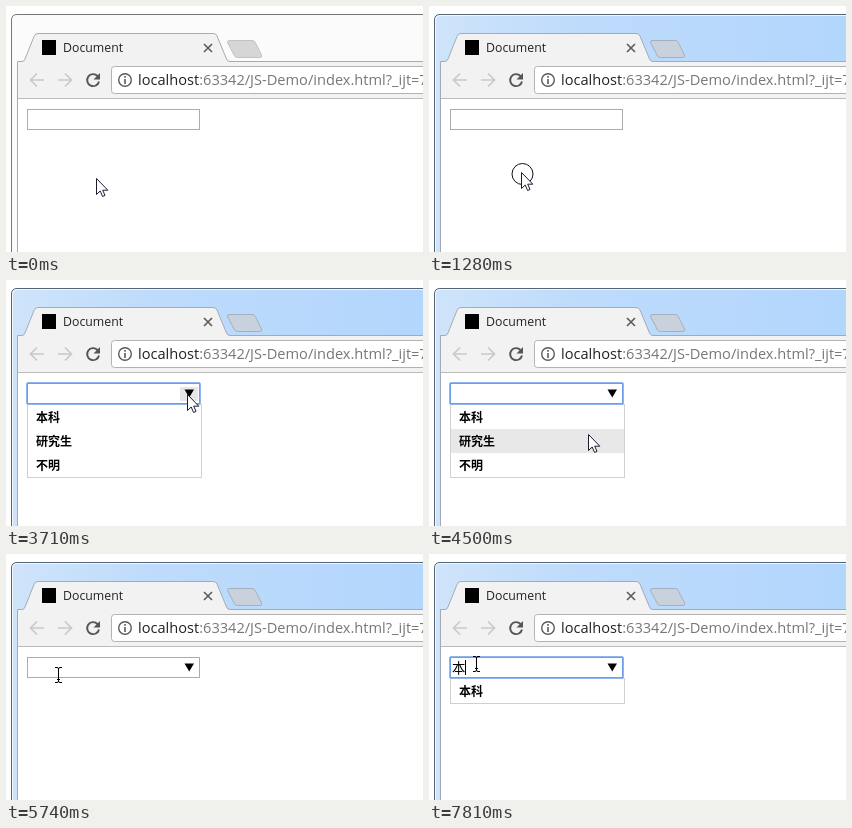
These frames come from a looping animation (417x246 px, 8 s). An HTML page:

```html
<!DOCTYPE html>
<html lang="en">
<head>
<meta charset="utf-8">
<title>Input with suggestions</title>
<style>
  html, body { margin: 0; width: 100%; height: 100%; overflow: hidden; background: #fff; }
  svg { display: block; width: 417px; height: 246px; }
  text { font-family: "Open Sans", "Noto Sans", sans-serif; white-space: pre; }
  .cjk { font-family: "Noto Sans CJK SC", "Noto Sans CJK", sans-serif; }
  .item { font-size: 12px; font-weight: 700; }
  .line { fill: none; stroke-width: 1; }
</style>
</head>
<body>
<svg viewBox="0 0 417 246">
  <defs>
    <linearGradient id="glass" x1="0" y1="0" x2="1" y2="0">
      <stop offset="0" stop-color="#cfe4fa"/>
      <stop offset=".35" stop-color="#bedbfb"/>
      <stop offset="1" stop-color="#b3d6fd"/>
    </linearGradient>
  </defs>

  <!-- window frame -->
  <path id="frame" d="M5.5 250V14Q5.5 8.500 11 8.500H420V250Z"/>
  <path id="shine" class="line" d="M6.500 250V14.500Q6.500 9.500 12 9.500H420" stroke="#fff" stroke-opacity=".75"/>
  <path id="plus" d="M223 34.500H246Q248.500 34.500 249.300 36.500L255.500 49Q256.500 51.500 254 51.500H231.500Q229 51.500 228 49L221.800 37Q221 34.500 223 34.500Z"/>

  <!-- tab and toolbar -->
  <path d="M11.500 250V55.500H16Q18 55.500 19 53L28 30.500Q29 27.500 32 27.500H207Q210 27.500 211 30L220.500 53Q221.500 55.500 224 55.500H420V250Z" fill="#f2f2f2" stroke="#a5abb2"/>
  <rect x="12" y="92" width="406" height="1" fill="#bcbcbc"/>
  <rect x="12" y="93" width="406" height="154" fill="#fff"/>
  <rect x="36" y="34" width="14" height="15" fill="#000"/>
  <text x="57" y="46" font-size="12.3" fill="#222">Document</text>
  <path d="M198 38L206 46M206 38L198 46" stroke="#5a5a5a" stroke-width="1.600"/>
  <g fill="none" stroke="#c9c9c9" stroke-width="1.700">
    <path d="M38 74H25M31 67.500L24.500 74L31 80.500"/>
    <path d="M52 74H65M59 67.500L65.500 74L59 80.500"/>
  </g>
  <path d="M91.500 70A6 6 0 1 0 93 75.500" fill="none" stroke="#555" stroke-width="1.900"/>
  <path d="M94 67V73.500H87.500Z" fill="#555"/>
  <rect x="105.500" y="60.500" width="330" height="27" rx="3" fill="#fff" stroke="#b3b3b3"/>
  <circle cx="119" cy="74" r="6.300" fill="none" stroke="#5a5a5a" stroke-width="1.400"/>
  <path d="M119 70V71.700M119 73V78" stroke="#5a5a5a" stroke-width="1.600"/>
  <text x="132" y="79" font-size="14.600" fill="#777"><tspan fill="#222">localhost</tspan>:63342/JS-Demo/index.html?_ijt=7</text>

  <!-- list of suggestions -->
  <g id="list">
    <rect id="panel" x="21.500" y="124.500" width="174" fill="#fff" stroke="#d0d0d0"/>
    <rect id="hover" x="22" width="173" height="24" fill="#e8e8e8"/>
    <text class="cjk item" x="30" y="142">本科</text>
    <g id="more">
      <text class="cjk item" x="30" y="166">研究生</text>
      <text class="cjk item" x="30" y="190">不明</text>
    </g>
  </g>

  <!-- input -->
  <rect x="21.500" y="103.500" width="172" height="20" fill="#fff" stroke="#ababab"/>
  <g id="focus" class="line">
    <rect x="20.500" y="102.500" width="174" height="22" rx="1.500" stroke="#8fb5ef"/>
    <rect x="21.500" y="103.500" width="172" height="20" stroke="#6c9de6"/>
  </g>
  <rect id="button" x="174" y="107" width="18" height="14" fill="#e6e6e6"/>
  <path id="arrow" d="M178.500 109.500H188L183.250 117.500Z"/>
  <text id="typed" class="cjk" x="23" y="118.500" font-size="13.300">本</text>
  <rect id="caret" y="106" width="1" height="15"/>

  <!-- input method -->
  <g id="ime">
    <rect x="24.500" y="126.500" width="400" height="50" fill="#fff" stroke="#b9c6d4"/>
    <rect x="32" y="151" width="386" height="1" fill="#e1e6ec"/>
    <text id="pinyin" x="34" y="144" font-size="14" fill="#333"></text>
    <text id="choices" class="cjk" x="34" y="169" font-size="14" fill="#333"></text>
  </g>

  <circle id="ring" r="10.500" class="line" stroke="#111"/>
  <path id="pointer" d="M.5 .5V16.500L4.200 13L6.600 18.500L9 17.400L6.700 12.200H11.800Z" fill="#fff" stroke="#1c1c30"/>
  <path id="beam" class="line" stroke="#000" d="M-3 -7.500H-1Q.5 -7.500 .5 -6V6Q.5 7.500 -1 7.500H-3M4 -7.500H2Q.5 -7.500 .5 -6V6Q.5 7.500 2 7.500H4M-1 4.500H2"/>
</svg>

<script>
const LOOP = 8000;
const el = {};
document.querySelectorAll("[id]").forEach(e => el[e.id] = e);

// Pointer legs: first change, last change, number of steps, points passed
const legs = [
  [60, 120, 2, [90, 172], [90, 170]],
  [340, 420, 2, [90, 170], [91, 166]],
  [570, 570, 1, [91, 166], [92, 166]],
  [1520, 1820, 6, [92, 166], [88, 140], [84, 119]],
  [1980, 1980, 1, [84, 119], [84, 120]],
  [2400, 2400, 1, [84, 120], [88, 120]],
  [2790, 3410, 10, [88, 120], [131, 155], [181, 114]],
  [4170, 4890, 11, [181, 114], [152, 160], [141, 206]],
  [4980, 5070, 2, [141, 206], [147, 212]],
  [5250, 5740, 9, [147, 212], [92, 165], [52, 121]],
  [5800, 5860, 2, [52, 121], [47, 110]]
];
const clicks = [[1280, 1370], [2400, 2460], [3590, 3710], [5130, 5190], [5870, 5940]];
const focused = [[2400, 5190], [5870, LOOP]];
const carets = [[2400, 2930], [5870, 6400], [6860, 7230], [7750, LOOP]];
const lists = [[3650, 5190], [7750, LOOP]];
const spelling = [[7230, "b", "1.不  2.把  3.吧  4.被  5.比"],
                  [7310, "be", "1.被  2.本  3.呗  4.北  5.倍"],
                  [7380, "ben", "1.本  2.笨  3.奔  4.苯  5.贲"]];

const within = (t, spans) => spans.some(([a, b]) => t >= a && t < b);
const show = (e, on) => e.setAttribute("visibility", on ? "inherit" : "hidden");
const place = (e, x, y) => e.setAttribute("transform", `translate(${x} ${y})`);

function position(t) {
  let leg = null;
  for (const l of legs) if (t >= l[0]) leg = l;
  if (!leg) return legs[0][3];
  const [a, b, n, ...pts] = leg;
  const step = t >= b ? n : 1 + Math.floor((t - a) / (b - a) * (n - 1));
  const k = step / n, p = k * k * (3 - 2 * k);
  const from = pts[0], to = pts[pts.length - 1], mid = pts.length > 2 && pts[1];
  return [0, 1].map(i => {
    const v = mid
      ? (1 - p) * (1 - p) * from[i] + 2 * p * (1 - p) * mid[i] + p * p * to[i]
      : from[i] + (to[i] - from[i]) * p;
    return Math.round(v);
  });
}

function draw(t) {
  const active = t >= 1280;
  el.frame.setAttribute("fill", active ? "url(#glass)" : "#fbfbfb");
  el.frame.setAttribute("stroke", active ? "#566575" : "#777");
  el.plus.setAttribute("fill", active ? "#c9d2dc" : "#d6d6d6");
  el.plus.setAttribute("stroke", active ? "#a2b0bf" : "#c2c2c2");
  show(el.shine, active);

  const [x, y] = position(t);
  const inside = x > 20 && x < 195 && y > 102 && y < 125;
  const onButton = inside && x > 173;
  const text = inside && !onButton;
  show(el.pointer, !text);
  show(el.beam, text);
  place(text ? el.beam : el.pointer, x, y);
  show(el.ring, within(t, clicks));
  place(el.ring, x + (text ? 0 : 1.5), y + (text ? -1 : 2));

  const focus = within(t, focused), typed = t >= 7750;
  show(el.focus, focus);
  show(el.arrow, focus || inside);
  show(el.button, onButton);
  show(el.typed, typed);
  show(el.caret, within(t, carets));
  el.caret.setAttribute("x", typed ? 36 : 23);

  const rows = typed ? 1 : 3, row = Math.floor((y - 126) / 24);
  show(el.list, within(t, lists));
  show(el.more, !typed);
  el.panel.setAttribute("height", rows * 24 + 1);
  show(el.hover, within(t, lists) && row >= 0 && row < rows);
  el.hover.setAttribute("y", 125 + row * 24);

  show(el.ime, t >= 7230 && !typed);
  const entry = spelling.filter(s => t >= s[0]).pop();
  el.pinyin.textContent = entry ? entry[1] : "";
  el.choices.textContent = entry ? entry[2] : "";
}

const start = performance.now();
function tick() {
  draw((performance.now() - start) % LOOP);
  requestAnimationFrame(tick);
}
tick();
</script>
</body>
</html>
```
